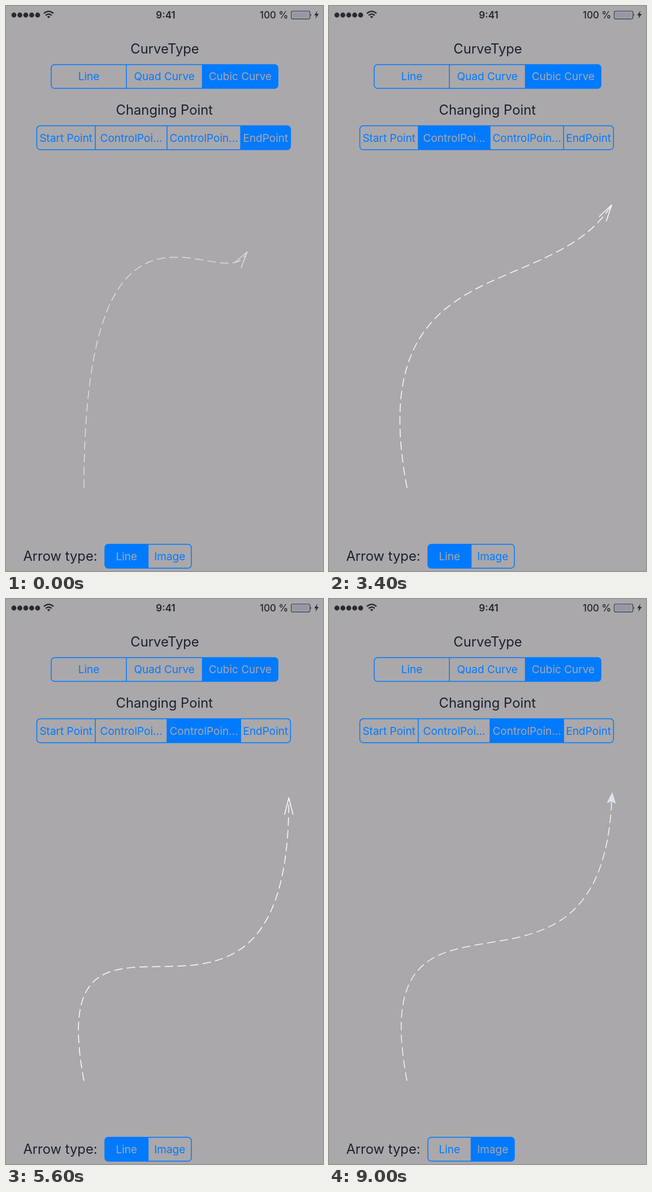
Write an HTML page that moves like this. It is 561 px wide and 998 px high and loops after 9.1 s.

```html
<!DOCTYPE html>
<html lang="en">
<head>
<meta charset="utf-8">
<title>Curve arrow demo</title>
<style>
  html, body { margin: 0; width: 100%; height: 100%; overflow: hidden; background: #aaa8ab; }
  svg { display: block; width: 561px; height: 998px; }
  text { font-family: Inter, Roboto, sans-serif; text-anchor: middle; }
  .title { font-size: 23.8px; fill: #1b212e; }
  .label { font-size: 19px; }
  .status { font-size: 17px; fill: #24252d; }
  .frame { fill: none; stroke: #007aff; stroke-width: 1.5; }
</style>
</head>
<body>
<svg id="stage" viewBox="0 0 561 998" xmlns="http://www.w3.org/2000/svg">
  <rect width="561" height="998" fill="#aaa8ab"/>
  <g id="signal" fill="#292a31"></g>
  <g fill="none" stroke="#292a31" stroke-width="2.3">
    <path d="M67 13.2Q75.5 5.5 84 13.2M70.2 16.7Q75.5 11.8 80.8 16.7"/>
    <path d="M75.5 21.8L72.6 18.8Q75.5 16.6 78.4 18.8Z" fill="#292a31" stroke="none"/>
  </g>
  <text class="status" x="282.5" y="21.5" font-weight="600">9:41</text>
  <text class="status" x="474.3" y="21.5" font-weight="500">100 %</text>
  <rect x="504.8" y="9" width="33" height="13.8" rx="2.5" fill="none" stroke="#343540" stroke-width="1.2"/>
  <rect x="506.8" y="11" width="29" height="9.8" rx="1" fill="#9698a5"/>
  <path d="M539 13.5q2.3 2.4 0 4.8z" fill="#343540"/>
  <path d="M551 8.5L545.5 16.5H549L547.3 22.5L553.5 14H549.8Z" fill="#292a31"/>

  <text class="title" x="281" y="84">CurveType</text>
  <text class="title" x="280.3" y="192.3">Changing Point</text>
  <text class="title" x="96" y="979.5">Arrow type:</text>
  <g id="controls"></g>

  <path id="curve" fill="none" stroke-width="1.5" stroke-dasharray="14.96 7.48"/>
  <path id="lineArrow" d="M-7.5 30L0 0L7.5 30" fill="none" stroke-width="1.5"/>
  <path id="imageArrow" d="M0 -10L8 10L0 6.5L-8 10Z" fill="#dee3ed"/>
</svg>
<script>
const NS = 'http://www.w3.org/2000/svg';
const LOOP = 9100, STEP = 100;
const BLUE = '#007aff', BACK = '#aaa8ab';
const $ = id => document.getElementById(id);

function add(parent, tag, attrs, text = '') {
  const node = document.createElementNS(NS, tag);
  set(node, attrs);
  node.textContent = text;
  parent.append(node);
  return node;
}

function set(node, attrs) {
  for (const key in attrs) node.setAttribute(key, attrs[key]);
}

// Linear interpolation through rows of [time, ...values].
function track(rows, time) {
  const next = rows.findIndex(row => row[0] > time);
  if (next === 0) return rows[0].slice(1);
  if (next < 0) return rows.at(-1).slice(1);
  const a = rows[next - 1], b = rows[next];
  const k = (time - a[0]) / (b[0] - a[0]);
  return a.slice(1).map((v, i) => v + (b[i + 1] - v) * k);
}

// A segmented control; edges are the x positions of its borders.
function segmented(edges, top, labels) {
  const group = add($('controls'), 'g', {});
  const left = edges[0], right = edges.at(-1), height = 42.2, r = 6;
  const segments = labels.map((label, i) => {
    const x = edges[i], end = edges[i + 1];
    const a = x === left ? r : 0, b = end === right ? r : 0;
    const fill = add(group, 'path', {
      fill: BLUE,
      d: `M${x + a} ${top}H${end - b}q${b} 0 ${b} ${b}v${height - 2 * b}q0 ${b} ${-b} ${b}` +
         `H${x + a}q${-a} 0 ${-a} ${-a}v${2 * a - height}q0 ${-a} ${a} ${-a}Z`
    });
    const text = add(group, 'text', { class: 'label', x: (x + end) / 2, y: top + 28 }, label);
    return { fill, text };
  });
  add(group, 'rect', { class: 'frame', x: left, y: top, width: right - left, height, rx: r });
  edges.slice(1, -1).forEach(x => add(group, 'path', { class: 'frame', d: `M${x} ${top}v${height}` }));

  return levels => segments.forEach(({ fill, text }, i) => {
    set(fill, { opacity: levels[i] });
    text.style.fill = `color-mix(in srgb, ${BACK} ${levels[i] * 100}%, ${BLUE})`;
  });
}

for (let i = 0; i < 5; i++) add($('signal'), 'circle', { cx: 14 + i * 10.5, cy: 16, r: 4.4 });

const curveType = segmented([80, 213, 347.5, 481.3], 103.4, ['Line', 'Quad Curve', 'Cubic Curve']);
const pointType = segmented([54.5, 158, 285, 415.2, 503.5], 211.6,
  ['Start Point', 'ControlPoi...', 'ControlPoin...', 'EndPoint']);
const arrowType = segmented([175, 251.5, 328], 950.8, ['Line', 'Image']);
curveType([0, 0, 1]);

const endPoint = [[0, 427, 434], [600, 500.5, 351]];
const control1 = [[2100, 138, 238], [3100, 57, 424]];
const control2 = [[4200, 391, 526], [4600, 432, 680], [5200, 503, 906], [5600, 503, 906], [6200, 483, 795]];
const arrowAngle = [[0, 35], [600, 32.7], [4200, 32.7], [4600, 16], [5200, 0], [5600, 0], [6200, 5]];
const strokeTone = [[0, 220, 232], [600, 236, 242], [2100, 242, 246], [3400, 250, 250], [6200, 252, 252], [7300, 243, 247]];
const selection = [
  [1300, 0, 0, 0, 1], [1500, 0, 1, 0, 0],
  [3700, 0, 1, 0, 0], [3900, 0, 0, 1, 0]
];
const arrowChoice = [[7100, 1, 0], [7300, 0.14, 0.88], [7500, 0, 1]];

function draw(time) {
  const [x, y] = track(endPoint, time);
  const [angle] = track(arrowAngle, time);
  const [tone, blue] = track(strokeTone, time);
  const [lineLevel, imageLevel] = track(arrowChoice, time);
  const stroke = `rgb(${tone},${tone},${blue})`;
  const transform = `translate(${x} ${y}) rotate(${angle})`;

  set($('curve'), { d: `M138 851C${track(control1, time)} ${track(control2, time)} ${x},${y}`, stroke });
  set($('lineArrow'), { transform, stroke, opacity: lineLevel });
  set($('imageArrow'), { transform, opacity: imageLevel });
  pointType(track(selection, time));
  arrowType([lineLevel, imageLevel]);
}

const start = performance.now();
function tick() {
  const time = (performance.now() - start) % LOOP;
  draw(Math.floor(time / STEP) * STEP);
  requestAnimationFrame(tick);
}
tick();
</script>
</body>
</html>
```
